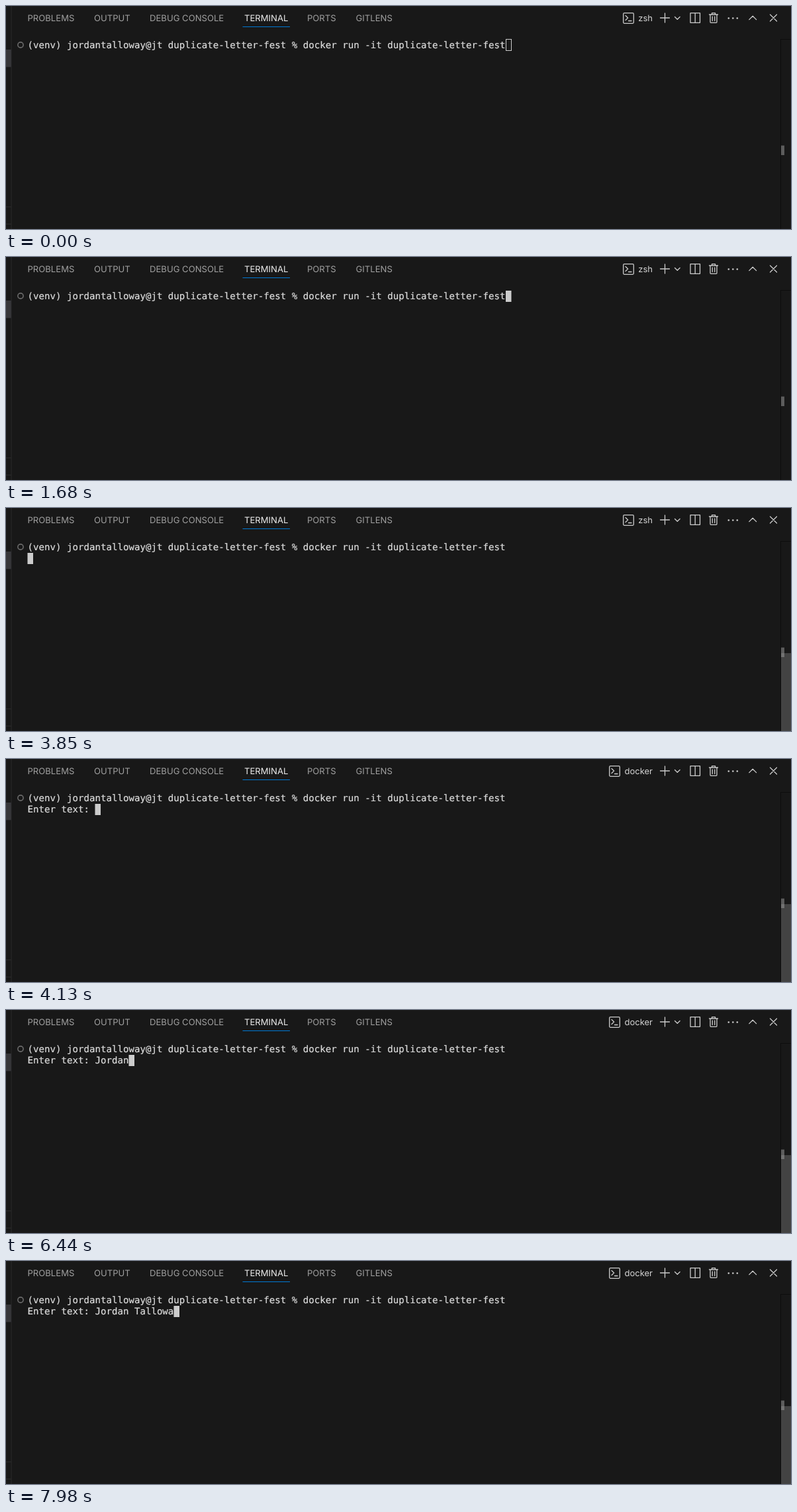
An HTML page for the animation above (8 s loop, 1186 by 338 pixels).

```html
<!DOCTYPE html>
<html lang="en">
<head>
<meta charset="utf-8">
<title>Terminal</title>
<style>
  html, body { margin: 0; width: 100%; height: 100%; overflow: hidden; background: #181818; }
  svg { display: block; }
  text { white-space: pre; text-rendering: geometricPrecision; }
  .ui { font: 13.1px Inter, "Open Sans", sans-serif; fill: #a0a0a0; }
  .ui .active { fill: #eee; }
  .ui .label { fill: #d4d4d4; font-size: 13px; }
  .mono { font: 14.11px "DejaVu Sans Mono", monospace; fill: #dcdcdc; stroke: #dcdcdc; stroke-width: .2; }
  .icon { fill: none; stroke: #ccc; stroke-width: 1.3; stroke-linecap: round; stroke-linejoin: round; }
</style>
</head>
<body>
<svg width="1186" height="338" viewBox="0 0 1186 338">
  <!-- side bar edge -->
  <path fill="#37373a" d="M0 66h8v26.5H0z"/>
  <path fill="#2b2b2b" d="M7.5 0h1v338h-1zM0 304h8v1H0zM0 330h8v1H0z"/>

  <!-- panel tabs -->
  <g class="ui">
    <text x="32.5" y="23">PROBLEMS</text>
    <text x="133" y="23">OUTPUT</text>
    <text x="217" y="23">DEBUG CONSOLE</text>
    <text x="360" y="23" class="active">TERMINAL</text>
    <text x="455" y="23">PORTS</text>
    <text x="528.5" y="23">GITLENS</text>
    <text id="shell" x="977" y="23" text-anchor="end" class="label"></text>
  </g>
  <path fill="#0078d4" d="M357.5 31h71.5v1h-71.5z"/>

  <!-- toolbar -->
  <g class="icon">
    <g id="shellIcon">
      <rect x=".7" y="10.7" width="15.6" height="15.6" rx="1.5"/>
      <path d="M4 14.5l3.6 3.5L4 21.5M8.5 22.5h4.5"/>
    </g>
    <path d="M988.5 18h14M995.5 11v14M1010.5 16.5l3.8 3.8 3.8-3.8"/>
    <path d="M1034 10.6h14.5v14.7H1034zM1041.2 10.6v14.7"/>
    <path d="M1062.5 13h13M1066.5 13v-2.3h5V13M1064 13v11.3q0 1 1 1h8q1 0 1-1V13M1067.3 15.8v6.7M1070.7 15.8v6.7"/>
    <path d="M1122.8 20.6l5.4-5.4 5.4 5.4M1154.5 13l10 10M1164.5 13l-10 10"/>
  </g>
  <g fill="#ccc">
    <circle cx="1091.8" cy="18.5" r="1.3"/>
    <circle cx="1098.3" cy="18.5" r="1.3"/>
    <circle cx="1104.8" cy="18.5" r="1.3"/>
  </g>

  <!-- scroll bar -->
  <path fill="#0d0d0d" d="M1170 50h16v1h-15v287h-1z"/>
  <path id="slider" fill="#434343" d="M1171 220h15v118h-15z"/>
  <path fill="#a0a0a0" fill-opacity=".5" d="M1171 211.5h5v14.5h-5z"/>

  <!-- terminal -->
  <circle cx="22" cy="59" r="4.1" fill="none" stroke="#6b6b6b" stroke-width="1.6"/>
  <g class="mono">
    <text x="32.5" y="64">(venv) jordantalloway@jt duplicate-letter-fest % docker run -it duplicate-letter-fest</text>
    <text id="entry" x="32.5" y="81"></text>
  </g>
  <rect id="cursor" stroke="#ccc"/>
</svg>
<script>
  const LOOP = 8000, CELL = 8.5, LEFT = 32.5;
  const PROMPT = "Enter text: ", TYPED = "Jordan Tallowa";
  const KEYS = [5530, 5670, 5810, 6160, 6300, 6440, 6790, 7140, 7350, 7560, 7630, 7770, 7770, 7980];
  const [shell, shellIcon, slider, entry, cursor] =
    ["shell", "shellIcon", "slider", "entry", "cursor"].map(id => document.getElementById(id));

  function set(el, attrs) {
    for (const name in attrs) el.setAttribute(name, attrs[name]);
  }

  function sliderOpacity(t) {
    if (t < 700) return 0;
    if (t < 1470) return 1;
    if (t < 1680) return 0.5;
    if (t < 2450) return 0;
    return t < 2520 ? 0.5 : 1;
  }

  function draw(t) {
    const running = t >= 4130, focused = t >= 700, entered = t >= 3850;
    const count = KEYS.filter(k => k <= t).length;
    const line = t < 4060 ? "" : PROMPT + TYPED.slice(0, count);
    const column = entered ? line.length : 85;
    const inset = focused ? 0 : 0.5;

    shell.textContent = running ? "docker" : "zsh";
    set(shellIcon, { transform: `translate(${running ? 911 : 932} 0)` });
    set(slider, { opacity: sliderOpacity(t) });
    entry.textContent = line;
    set(cursor, {
      x: LEFT + column * CELL + inset,
      y: (entered ? 68 : 51) - inset,
      width: CELL - inset,
      height: 17,
      fill: focused ? "#ccc" : "none",
      "stroke-width": focused ? 0 : 1
    });
  }

  function tick() {
    draw(performance.now() % LOOP);
    requestAnimationFrame(tick);
  }
  tick();
</script>
</body>
</html>
```
